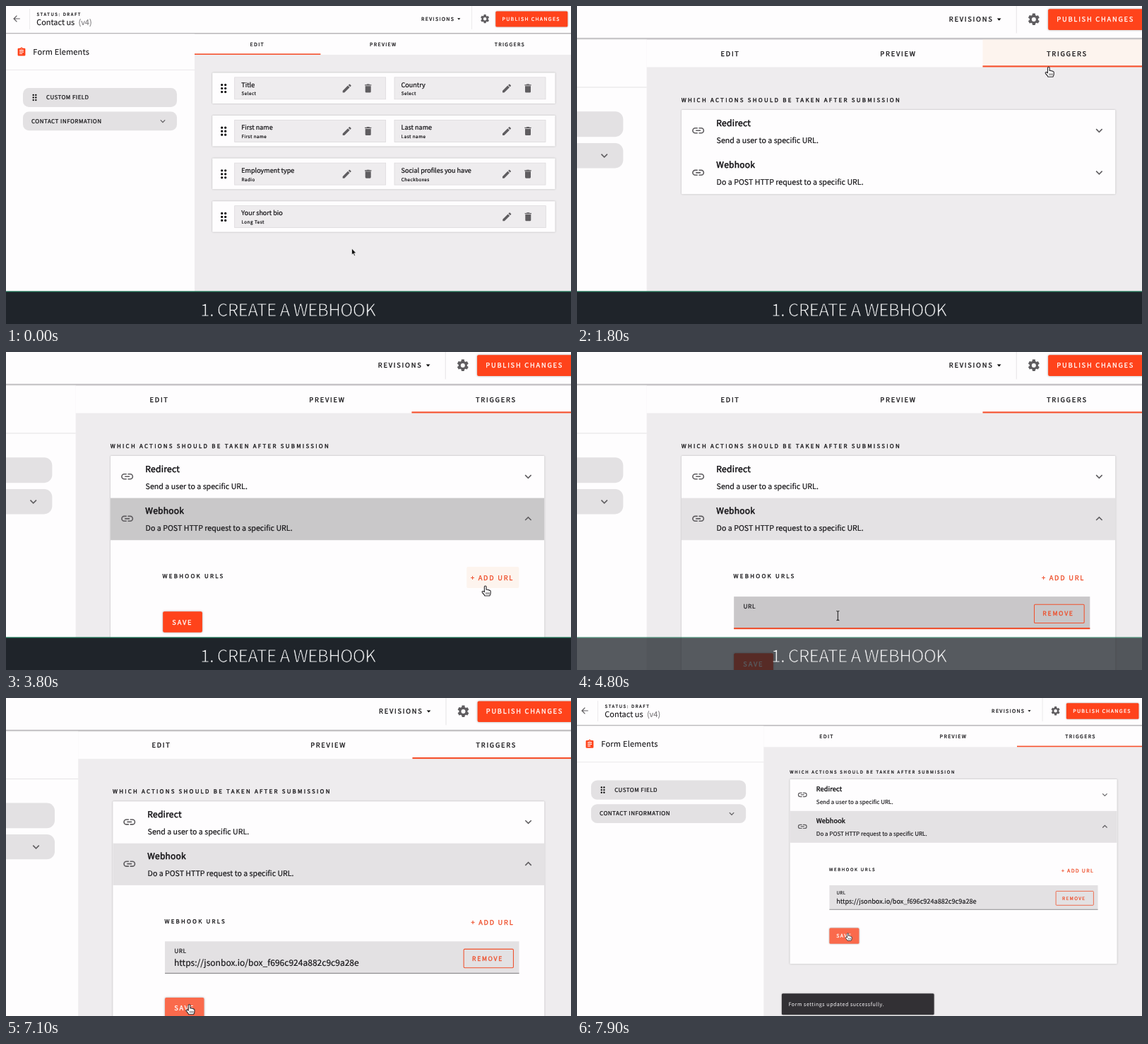
Recreate the animation shown at these times as an HTML page. Size 800 by 450 pixels, loop 8 s.

```html
<!DOCTYPE html>
<html lang="en">
<head>
<meta charset="utf-8">
<title>Create a webhook</title>
<style>
html, body { margin: 0; width: 100%; height: 100%; overflow: hidden; background: #fefdfe; }
svg { display: block; width: 100vw; height: 100vh; }
text {
  font-family: "Noto Sans CJK SC", "Noto Sans CJK JP", "Noto Sans CJK", "Noto Sans", sans-serif;
  text-rendering: geometricPrecision; white-space: pre; stroke-linejoin: round;
}
.lift { filter: drop-shadow(0 .7px .8px rgba(0, 0, 0, .26)); }
.raised { filter: drop-shadow(0 .8px 1.1px rgba(0, 0, 0, .34)); }
</style>
</head>
<body>
<svg id="stage" viewBox="0 0 800 450"></svg>
<script>
const LOOP = 8000;
const ORANGE = '#ff431b', GREY = '#eeecee', PILL = '#e3e1e3', ICON = '#5f5d60', INK = '#141316', WARM = '#fdf4ee';
const LATIN_SCALE = 1.117; // Latin letters in the CJK face are drawn this much larger
const REGULAR = .08, MEDIUM = .24, SEMIBOLD = .38; // outline widths that stand in for font weights

const ICONS = {
  back: 'M20 11H7.83l5.59-5.59L12 4l-8 8 8 8 1.41-1.41L7.83 13H20z',
  gear: 'M19.14 12.94c.04-.3.06-.61.06-.94s-.02-.64-.07-.94l2.03-1.58a.49.49 0 0 0 .12-.61l-1.92-3.32a.49.49 0 0 0-.59-.22l-2.39.96a7 7 0 0 0-1.62-.94l-.36-2.54A.48.48 0 0 0 13.92 2h-3.84a.48.48 0 0 0-.47.41l-.36 2.54a7 7 0 0 0-1.62.94l-2.39-.96a.48.48 0 0 0-.59.22L2.74 8.87a.48.48 0 0 0 .12.61l2.03 1.58a6 6 0 0 0 0 1.88l-2.03 1.58a.49.49 0 0 0-.12.61l1.92 3.32c.12.22.37.29.59.22l2.39-.96c.5.38 1.03.7 1.62.94l.36 2.54c.05.24.24.41.48.41h3.84c.24 0 .44-.17.47-.41l.36-2.54a7 7 0 0 0 1.62-.94l2.39.96c.22.08.47 0 .59-.22l1.92-3.32a.48.48 0 0 0-.12-.61zM12 15.6a3.6 3.6 0 1 1 0-7.2 3.6 3.6 0 0 1 0 7.2z',
  clipboard: 'M19 3h-4.2a3 3 0 0 0-5.6 0H5a2 2 0 0 0-2 2v14a2 2 0 0 0 2 2h14a2 2 0 0 0 2-2V5a2 2 0 0 0-2-2zm-7 0a1 1 0 1 1 0 2 1 1 0 0 1 0-2zm2 14H7v-2h7zm3-4H7v-2h10zm0-4H7V7h10z',
  pencil: 'M3 17.25V21h3.75L17.81 9.94l-3.75-3.75zM20.71 7.04a1 1 0 0 0 0-1.41l-2.34-2.34a1 1 0 0 0-1.41 0l-1.83 1.83 3.75 3.75z',
  trash: 'M6 19a2 2 0 0 0 2 2h8a2 2 0 0 0 2-2V7H6zM19 4h-3.5l-1-1h-5l-1 1H5v2h14z',
  chevron: 'M16.59 8.59L12 13.17 7.41 8.59 6 10l6 6 6-6z',
  link: 'M3.9 12A3.1 3.1 0 0 1 7 8.9h4V7H7a5 5 0 0 0 0 10h4v-1.9H7A3.1 3.1 0 0 1 3.9 12zM8 13h8v-2H8zm9-6h-4v1.9h4a3.1 3.1 0 0 1 0 6.2h-4V17h4a5 5 0 0 0 0-10z',
  dots: [9, 15].map(x => [6, 12, 18].map(y => `M${x - 2} ${y}a2 2 0 1 0 4 0 2 2 0 1 0-4 0z`).join('')).join('')
};

const rect = (x, y, w, h, fill, more = '') =>
  `<rect x="${x}" y="${y}" width="${w}" height="${h}" fill="${fill}" ${more}/>`;
const text = (x, y, str, size, { gap = 0, weight = REGULAR, fill = INK, edge = fill, more = '' } = {}) =>
  `<text x="${x}" y="${y}" font-size="${(size / LATIN_SCALE).toFixed(2)}" letter-spacing="${gap}" fill="${fill}" stroke="${edge}" stroke-width="${weight}" ${more}>${str}</text>`;
const icon = (name, x, y, scale, fill = ICON, more = '') =>
  `<g transform="translate(${x} ${y}) scale(${scale})"><path ${more} d="${ICONS[name]}" fill="${fill}" transform="translate(-12 -12)"/></g>`;
const button = (x, y, str, fill = INK, size = 7.78) => text(x, y, str, size, { gap: 1.32, weight: MEDIUM, fill });
const label = (x, y, str) => text(x, y, str, 6.67, { gap: 1.68, weight: MEDIUM });

const TAB_X = 267, TAB_W = 178.4;
const CARD = { x: 304, y: 114.4, w: 460.7 };
const ROW_H = 44.7, FIELD_SHIFT = 44.3;

const header = () =>
  rect(-10, -10, 830, 48.5, '#fefdfe') + rect(-10, 38, 830, .9, '#b4b2b5') + rect(-10, 38.9, 830, 1.1, '#000', 'opacity=".09"') +
  icon('back', 15, 18, .6) + rect(33, 4, .7, 29, '#e4e2e4') +
  text(43.5, 14, 'STATUS: DRAFT', 6.67, { gap: 1.6, weight: MEDIUM }) +
  text(43.3, 27.4, 'Contact us', 12.2) + text(102.5, 27.4, '(v4)', 12.2, { fill: '#777578' }) +
  button(588.1, 20.9, 'REVISIONS') + '<path d="M639.1 17.2h4.2l-2.1 2.4z"/>' +
  rect(659.3, 0, .7, 33, '#e4e2e4') + icon('gear', 678.1, 18.3, .63) +
  rect(693.3, 7.4, 102, 22.2, ORANGE, 'rx="1.5" class="raised"') + button(702.5, 20.9, 'PUBLISH CHANGES', '#fff');

const sidebar = () =>
  rect(-10, 39, 277, 430, '#fefdfe') +
  icon('clipboard', 22, 65.1, .6, ORANGE) + text(38.3, 69.1, 'Form Elements', 12.22, { gap: .22 }) +
  rect(-10, 90, 277, .8, '#e6e4e6') +
  rect(24, 116, 218, 27, PILL, 'rx="8.5"') + rect(24, 149.6, 218, 26.6, PILL, 'rx="8.5"') +
  icon('dots', 40.5, 129.5, .6, '#111') + text(57, 132.4, 'CUSTOM FIELD', 8.89, { gap: .45, weight: MEDIUM }) +
  text(36, 165.6, 'CONTACT INFORMATION', 8.89, { gap: .5, weight: MEDIUM }) + icon('chevron', 222, 163, .6);

const tabs = () =>
  rect(TAB_X, 40, 560, 29, '#fefdfe') + rect(TAB_X + 2 * TAB_W, 39.5, TAB_W, 29.5, WARM, 'id="tabHover"') +
  ['EDIT', 'PREVIEW', 'TRIGGERS'].map((s, i) => button([345.6, 515, 691.7][i], 57.1, s)).join('') +
  rect(TAB_X, 67.4, TAB_W, 1.6, '#f5502c', 'id="underline"');

function formField(x, y, w, title, kind) {
  const right = x + w;
  return rect(x, y + 6.5, w, 31, GREY, 'stroke="#d9d7d9" stroke-width=".7"') +
    text(x + 9.6, y + 20.2, title, 10.1, { weight: MEDIUM }) + text(x + 9.8, y + 32, kind, 7, { gap: .5, weight: MEDIUM }) +
    icon('pencil', right - 55, y + 22.1, .667) + icon('trash', right - 25, y + 22.1, .667);
}

const formRow = (i, ...fields) => {
  const y = 94.4 + i * 60.6;
  return rect(292.2, y, 485.4, 43.6, '#fefdfe', 'class="lift" rx=".7"') + icon('dots', 308.2, y + 22.2, .833, '#0b0a0c') +
    fields.map((f, k) => formField(k ? 550 : 323.7, y, fields.length > 1 ? 214 : 440.6, ...f)).join('');
};

const editPage = () => '<g id="editPage">' +
  formRow(0, ['Title', 'Select'], ['Country', 'Select']) +
  formRow(1, ['First name', 'First name'], ['Last name', 'Last name']) +
  formRow(2, ['Employment type', 'Radio'], ['Social profiles you have', 'Checkboxes']) +
  formRow(3, ['Your short bio', 'Long Test']) + '</g>';

const actionRow = (i, title, note) => {
  const y = CARD.y + i * ROW_H;
  return icon('link', 321.7, y + 21.9, .64) +
    text(341, y + 17, title, 10.1, { gap: .17, weight: SEMIBOLD }) + text(341.2, y + 34.9, note, 8.93, { weight: .14 }) +
    icon('chevron', 747.5, y + 21.9, .6, ICON, `id="chevron${i}"`);
};

const triggersPage = () => '<g id="triggersPage">' +
  label(303.8, 106.2, 'WHICH ACTIONS SHOULD BE TAKEN AFTER SUBMISSION') +
  rect(CARD.x, CARD.y, CARD.w, 90, '#fefdfe', 'id="card" class="lift" rx=".8"') +
  '<clipPath id="cardClip"><rect id="clipBox" x="304" y="114.4" width="460.7" height="90"/></clipPath><g clip-path="url(#cardClip)">' +
  rect(CARD.x, 159.1, CARD.w, ROW_H, '#e4e2e4', 'id="rowOpen"') + rect(CARD.x, 159.1, CARD.w, ROW_H, '#000', 'id="rowShade"') +
  actionRow(0, 'Redirect', 'Send a user to a specific URL.') +
  actionRow(1, 'Webhook', 'Do a POST HTTP request to a specific URL.') +
  '<g id="body">' + label(359.2, 244.2, 'WEBHOOK URLS') +
  rect(682.2, 232.2, 55.5, 22.5, WARM, 'id="addHover" rx="1.5"') + button(686.4, 246.1, '+ ADD URL', '#ee4c28') +
  '<g id="field">' + rect(359.6, 263.7, 378.1, 34.4, PILL, 'id="fieldBox"') +
  rect(359.6, 297.3, 378.1, .9, '#8b898c', 'id="fieldLine"') +
  text(369.6, 276.5, 'URL', 7, { gap: .4, weight: .14 }) +
  text(369.4, 289.7, 'https://jsonbox.io/box_f696c924a882c9c9a28e', 10.15, { weight: .14, more: 'id="url"' }) +
  rect(678.6, 272, 53, 19.8, 'none', 'stroke="#f0512d" stroke-width=".8" rx="1"') + button(687.5, 284.2, 'REMOVE', '#ee4c28', 7.2) +
  '</g><g id="save">' + rect(359.6, 279.5, 41.8, 22.2, ORANGE, 'id="saveBox" rx="1.5" class="raised"') +
  button(369.5, 293.3, 'SAVE', '#fff') + '</g></g></g></g>';

const snackbar = () => '<g id="snackbar">' + rect(292.5, 416, 214.5, 30, '#323034', 'rx="1.5" class="raised"') +
  text(302, 433.7, 'Form settings updated successfully.', 7.78, { gap: .56, fill: '#e6e4e7' }) + '</g>';

const pointers = () => '<g id="pointer">' +
  '<path id="arrow" d="M0 0V9.2L2.1 7.3 3.6 10.7 5 10.1 3.6 6.8H6.5Z" fill="#111" stroke="#fff" stroke-width=".7"/>' +
  '<path id="beam" d="M-1.5-5Q0-5 0-4V4Q0 5-1.5 5M1.5-5Q0-5 0-4M0 4Q0 5 1.5 5" fill="none" stroke="#222" stroke-width=".8"/>' +
  '<g id="hand" stroke="#2b292c" stroke-width=".85" stroke-linejoin="round"><path fill="#fff" d="M-1 1Q-1 0 0 0Q1 0 1 1V4Q2.2 3.3 2.7 4.3Q3.9 3.8 4.3 4.8Q5.6 4.6 5.6 6V7.5Q5.6 9 4.6 10.5H-.6Q-1 9.3-3 7.3Q-4 6-2.8 5.6Q-2 5.4-1 6.4Z"/>' +
  '<path fill="none" stroke-width=".6" d="M.9 6.8V9M2.4 6.8V9M3.9 6.8V9"/></g></g>';

// An outline in the bar's own colour thins the caption to a light weight
const BAR = '#1f242a';
const caption = () => '<g id="caption">' + rect(0, 404, 800, 46, BAR) + rect(0, 403.4, 800, 1.3, '#1c7355') +
  text(275, 439.2, '1. CREATE A WEBHOOK', 27.3, { gap: -.68, weight: .8, fill: '#f4f5f6', edge: BAR }) + '</g>';

document.getElementById('stage').innerHTML = '<g id="world">' + rect(-10, -10, 840, 480, GREY) +
  editPage() + triggersPage() + sidebar() + tabs() + header() + snackbar() + pointers() + '</g>' + caption();

const el = {};
document.querySelectorAll('[id]').forEach(node => el[node.id] = node);
const set = (id, attrs) => { for (const k in attrs) el[id].setAttribute(k, attrs[k]); };
const show = (id, on) => set(id, { opacity: +on });

const ramp = (t, from, to) => Math.min(1, Math.max(0, (t - from) / (to - from)));
const ease = u => u < .5 ? 2 * u * u : 1 - 2 * (1 - u) * (1 - u);
const glide = (t, from, to) => ease(ramp(t, from, to));

// Pointer moves: start, end, target x, target y
const START = [489.5, 343];
const MOVES = [
  [150, 880, 714, 58.3], [1700, 2200, 466.5, 187.2], [2800, 3600, 702, 252.4],
  [4200, 4700, 470, 284], [5350, 5750, 418, 318], [5900, 6300, 385.6, 331.1]
];

function pointerAt(t) {
  let [x, y] = START;
  for (const [from, to, tx, ty] of MOVES) {
    const u = glide(t, from, to);
    x += (tx - x) * u;
    y += (ty - y) * u;
  }
  return [x, y];
}

function draw(t) {
  const zoom = glide(t, 200, 1200) - glide(t, 7000, 7990);
  set('world', { transform: `translate(${-257.3 * zoom} ${-5.5 * zoom}) scale(${1 + zoom / 3})` });

  const [px, py] = pointerAt(t);
  const over = (x, y, w, h) => px >= x && px <= x + w && py >= y && py <= y + h;
  const onTriggers = t >= 1350, hasField = t >= 4050;
  const open = glide(t, 2250, 2450), grow = glide(t, 4050, 4150);

  show('editPage', !onTriggers);
  show('triggersPage', onTriggers);
  set('underline', { x: TAB_X + 2 * TAB_W * glide(t, 1300, 1550) });

  const height = 2 * ROW_H + 126.3 * open + FIELD_SHIFT * grow;
  set('card', { height });
  set('clipBox', { height });
  set('chevron1', { transform: `rotate(${180 * open}) translate(-12 -12)` });
  show('body', open > 0);
  show('field', hasField);
  set('save', { transform: `translate(0 ${FIELD_SHIFT * grow})` });

  const tabHover = over(TAB_X + 2 * TAB_W, 39, TAB_W, 30);
  const rowHover = onTriggers && over(CARD.x, CARD.y, CARD.w, 2 * ROW_H);
  const addHover = open === 1 && over(682.2, 232.2, 55.5, 22.5);
  const saveHover = hasField && over(359.6, 279.5 + FIELD_SHIFT, 41.8, 22.2);
  const fieldHover = hasField && over(359.6, 263.7, 318, 34.4);

  show('tabHover', tabHover);
  show('addHover', addHover);
  set('saveBox', { fill: saveHover ? '#fa6a4c' : ORANGE });
  set('rowOpen', { opacity: open });
  set('rowShade', { opacity: .018 * open + .1 * ramp(t, 2800, 3000) - .118 * ramp(t, 4000, 4150) });

  const focused = t >= 4750 && t < 6500;
  set('fieldBox', { fill: focused ? '#c9c7c9' : PILL });
  set('fieldLine', { fill: focused ? '#f0441f' : '#8b898c', y: focused ? 296.8 : 297.3, height: focused ? 1.5 : .9 });
  show('url', t >= 5100);

  const hand = tabHover || rowHover || addHover || saveHover;
  set('pointer', { transform: `translate(${px} ${py})` });
  show('hand', hand);
  show('beam', fieldHover && !hand);
  show('arrow', !hand && !fieldHover);

  set('snackbar', { opacity: ramp(t, 6800, 7000) });
  set('caption', { opacity: 1 - ramp(t, 4700, 5100) });
}

const began = performance.now();
function tick() {
  draw((performance.now() - began) % LOOP);
  requestAnimationFrame(tick);
}
tick();
</script>
</body>
</html>
```
